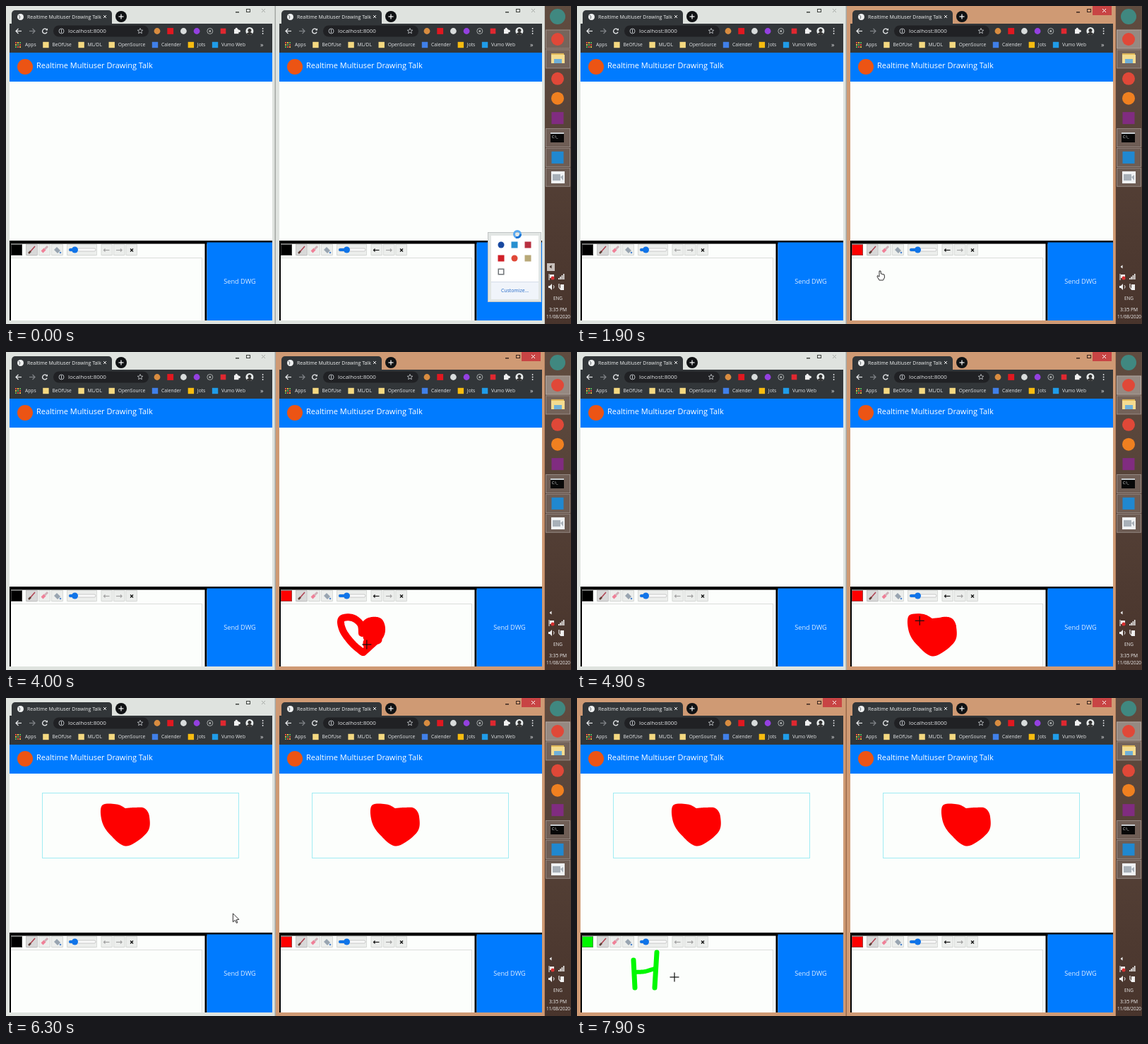
Write an HTML page with a canvas that moves like this. It is 800 px wide and 450 px high and loops after 8 s.

```html
<!DOCTYPE html>
<html lang="en">
<head>
<meta charset="utf-8">
<title>Drawing Talk</title>
<style>
html, body { margin: 0; width: 100%; height: 100%; overflow: hidden; }
canvas { display: block; width: 800px; height: 450px; }
</style>
</head>
<body>
<canvas id="stage" width="800" height="450"></canvas>
<script>
const g = document.getElementById('stage').getContext('2d');
const LOOP = 8000, SHIFT = 382, RED = '#fe0000', GREEN = '#00f800', TAN = '#cf9a74', PALE = '#dfe3df';
const at = { tray: 700, right: 900, pickRight: 1500, red: 1900, send: 5450, framed: 6000, left: 6400, pickLeft: 6600, green: 7000 };
const range = n => [...Array(n).keys()];

// Basic shapes
function rect(x, y, w, h, fill) { g.fillStyle = fill; g.fillRect(x, y, w, h); }
function square(x, y, r, fill) { rect(x - r, y - r, 2 * r, 2 * r, fill); }
function edge(x, y, w, h, color, lw = 1) {
  g.strokeStyle = color; g.lineWidth = lw; g.strokeRect(x + .5, y + .5, w - 1, h - 1);
}
function dot(x, y, r, fill) { g.fillStyle = fill; g.beginPath(); g.arc(x, y, r, 0, 7); g.fill(); }
function ring(x, y, r, color, lw = 1, a = 0, b = 7) {
  g.strokeStyle = color; g.lineWidth = lw; g.beginPath(); g.arc(x, y, r, a, b); g.stroke();
}
function round(x, y, w, h, r, fill) { g.fillStyle = fill; g.beginPath(); g.roundRect(x, y, w, h, r); g.fill(); }
function trace(p) { g.beginPath(); p.forEach(([x, y]) => g.lineTo(x, y)); }
function line(p, color, lw = 1) { trace(p); g.strokeStyle = color; g.lineWidth = lw; g.stroke(); }
function poly(p, fill) { trace(p); g.fillStyle = fill; g.fill(); }
function cross(x, y, r, color, lw = 1) {
  line([[x - r, y - r], [x + r, y + r]], color, lw); line([[x + r, y - r], [x - r, y + r]], color, lw);
}
function plus(x, y, r, color) {
  line([[x - r, y], [x + r, y]], color, 1.2); line([[x, y - r], [x, y + r]], color, 1.2);
}
function arrow(x, y, dir, head, color) {
  line([[x - 4 * dir, y], [x + 4 * dir, y]], color, 1.2);
  line([[x + (4 - head) * dir, y - head], [x + 4 * dir, y], [x + (4 - head) * dir, y + head]], color, 1.2);
}
function text(s, x, y, size, color, align = 'left') {
  g.font = size + 'px "Open Sans", "Noto Sans", sans-serif';
  g.textAlign = align; g.fillStyle = color; g.fillText(s, x, y);
}

// Ink: smooth curves through a few points
const pair = s => s.split(' ').map(q => q.split(',').map(Number));
function smooth(p) {
  const out = [];
  for (let i = 0; i < p.length - 1; i++) {
    const a = p[i - 1] || p[i], b = p[i], c = p[i + 1], d = p[i + 2] || c;
    for (let u = 0; u < 1; u += .1) out.push([0, 1].map(k => b[k] + .5 * u * (c[k] - a[k] +
      u * (2 * a[k] - 5 * b[k] + 4 * c[k] - d[k] + u * (3 * (b[k] - c[k]) + d[k] - a[k])))));
  }
  return [...out, p[p.length - 1]];
}
// Sweeps left and right n times while y runs from y0 to y1
function zigzag(n, y0, y1, leftAt, width) {
  return range(n).map(i => {
    const y = y0 + (y1 - y0) * i / (n - 1);
    return [leftAt(y) + (i % 2 ? 0 : width), y];
  });
}
const heart = smooth(pair('169,156 182,155 196,156 203,168 200,190 171,209.5 148,194 136,175 136,152 157,150.5 169,156'));
const sketch = heart.map(([x, y]) => [x + 334, y + 221]);
const stroke = (t0, t1, color, width, pts, inside) => ({ t0, t1, color, width, inside, pts: smooth(pts) });
const strokes = [
  stroke(2200, 2600, RED, 10, pair('504,398 502,385 490,376 475,378 477,394 490,412 505,425')),
  stroke(2650, 3250, RED, 10, pair('505,390 514,381 529,382 530,401 506,425')),
  stroke(3450, 4000, RED, 11, zigzag(8, 385, 411, () => 511, 16), true),
  stroke(4000, 4850, RED, 11, zigzag(12, 414, 380, y => 479 + (y - 380) / 2, 15), true),
  stroke(7150, 7350, GREEN, 7, pair('80,371 82,410')),
  stroke(7400, 7500, GREEN, 6, pair('82,388 96,387 110,383')),
  stroke(7550, 7760, GREEN, 7, pair('113,360 110,410'))
];

function drawn(s, t) {
  const n = (s.pts.length - 1) * Math.min(1, Math.max(0, (t - s.t0) / (s.t1 - s.t0)));
  const i = Math.floor(n), a = s.pts[i], b = s.pts[i + 1] || a, f = n - i;
  return [...s.pts.slice(0, i + 1), [a[0] + (b[0] - a[0]) * f, a[1] + (b[1] - a[1]) * f]];
}
function ink(t) {
  for (const s of strokes) {
    if (t < s.t0 || (s.color === RED && t >= at.send)) continue;
    g.save();
    if (s.inside) { trace(sketch); g.clip(); }
    g.lineCap = g.lineJoin = 'round';
    line(drawn(s, t), s.color, s.width);
    g.restore();
  }
  if (t >= 4850 && t < at.send) poly(sketch, RED);
}

// Browser window
function frame(active) {
  rect(0, 0, SHIFT, 450, active ? TAN : PALE);
  rect(380.5, 0, 1.5, 450, active ? '#9a6a4c' : '#a4a8a4');
  if (active) rect(348, 0, 27, 13, '#c84444');
  const dark = active ? '#3c2820' : '#404440';
  rect(325, 8, 5, 1.5, dark);
  edge(340, 4, 6, 5, dark);
  cross(364.5, 6.5, 2.5, active ? '#fff' : '#a8aca8');
}
function tabs() {
  round(8, 6, 142, 24, [5, 5, 0, 0], '#323639');
  rect(5, 25, 372, 41, '#323639');
  dot(20.5, 15.5, 4.5, '#eef0f0');
  line([[18, 13], [20, 15], [19, 18]], '#62686c');
  text('Realtime Multiuser Drawing Talk', 30, 18, 7, '#eef0f0');
  cross(140, 15, 2, '#e8e8e8');
  dot(163, 15, 8, '#101214');
  plus(163, 15, 3.5, '#fff');
}
function addressBar() {
  const y = 35.5;
  arrow(18, y, -1, 3.5, '#e8eaec');
  arrow(37, y, 1, 3.5, '#808488');
  ring(55, y, 3.3, '#e8eaec', 1.3, .4, 5.5);
  poly([[56, 34.5], [59, 34.5], [59, 31.5]], '#e8eaec');
  round(67, 27.5, 135, 16, 8, '#202124');
  ring(78.5, y, 3.5, '#b8bcc0'); rect(78, 33, 1, 5, '#b8bcc0');
  text('localhost:8000', 88, 38.3, 8, '#e0e2e4');
  line(range(11).map(i => {
    const a = i * Math.PI / 5, r = i % 2 ? 1.8 : 4;
    return [190 + r * Math.sin(a), y - r * Math.cos(a)];
  }), '#c8ccd0', .8);

  const slot = i => 214 + 18.7 * i;
  ['#d88c40', '', '#d8dcdc', '#9440e0'].forEach((c, i) => c && dot(slot(i), y, 4.4, c));
  square(slot(1), y, 4.4, '#e01820');
  ring(slot(4), y, 4, '#a8acac'); dot(slot(4), y, 1.5, '#a8acac');
  square(slot(5), y, 3.8, '#e02830');
  square(slot(6), y + .5, 3.2, '#f0f0f0'); dot(slot(6), y - 3, 1.7, '#f0f0f0'); dot(slot(6) + 4, y, 1.7, '#f0f0f0');
  g.save();
  g.beginPath(); g.arc(slot(7), y, 5.5, 0, 7); g.clip();
  square(slot(7), y, 6, '#e8ecec'); dot(slot(7), y - 1, 2.5, '#303030'); dot(slot(7), y + 6, 4.5, '#303030');
  g.restore();
  for (const k of [-1, 0, 1]) dot(slot(8), y + 3.5 * k, .9, '#e8eaec');
}
function bookmarks() {
  const dots = ['#e85040', '#e8b840', '#58b058'];
  for (const i of range(9)) rect(13 + i % 3 * 3, 51 + (i / 3 | 0) * 3, 2, 2, dots[(i + (i / 3 | 0)) % 3]);
  const marks = [['Apps'], ['BeOfUse', '#f4d880'], ['ML/DL', '#f4d880'], ['OpenSource', '#f4d880'],
    ['Calender', '#4080e8'], ['Jots', '#f8bc10'], ['Vumo Web', '#209ce8']];
  let x = 27;
  for (const [name, color] of marks) {
    if (color) square(x - 9, 55, 4.2, color);
    text(name, x, 57.3, 6.7, '#e4e6e8');
    x += g.measureText(name).width + 22.8;
  }
  text('»', 360, 57.5, 9, '#e8e8e8');
}
function tool(x, w, on) {
  round(x, 337, w, 16.5, 2, on ? '#d8d8d8' : '#eceeec');
  edge(x, 337, w, 16, on ? '#c0c0c0' : '#d4d6d4', .8);
}
function toolbar(t, right) {
  const picked = right ? t >= at.red : t >= at.green;
  rect(7, 337.5, 16, 15.5, picked ? (right ? RED : GREEN) : '#000');
  edge(7, 337, 16, 16, '#606060', .6);
  for (const i of range(3)) tool(28 + 18 * i, 17, !i);
  line([[34, 348], [41, 340]], '#b04050', 1.5); line([[32, 350], [35, 347]], '#604038', 2.5);
  line([[51, 348], [55, 344]], '#f08098', 4); line([[55, 344], [59, 340]], '#d0b0b8', 3);
  poly([[68, 345], [72, 341], [77, 346], [73, 350]], '#98a4b0'); dot(77, 349, 1.3, '#5088d0');
  tool(86, 43);
  const thumb = right ? 100.5 : 97.5;
  round(89, 343, 38, 4, 2, '#fafafa');
  g.strokeStyle = '#b8b8b8'; g.lineWidth = .7; g.stroke();
  round(89, 343, thumb - 89, 4, 2, '#1074e8'); dot(thumb, 345, 4.5, '#1074e8');
  for (const i of range(3)) tool(134.5 + 17.5 * i, 16.5);
  arrow(142.5, 345.5, -1, 2, right ? '#181818' : '#a0a0a0');
  arrow(160, 345.5, 1, 2, '#a0a0a0');
  cross(178, 345.5, 2, '#101010', 1.3);
  if (right && t >= 1050 && t < at.pickRight) edge(28, 337, 17.5, 17, '#101010', 1.7);
}
function picker() {
  rect(8, 357, 145, 36, '#f4f4f4'); edge(8, 357, 145, 36, '#c8c8d0');
  const s = 10.6;
  for (const row of range(3)) {
    rect(10, 359 + row * s, s, s, `hsl(0 0% ${100 - 50 * row}%)`);
    for (const col of range(12))
      rect(23 + col * s, 359 + row * s, s + .2, s + .2, `hsl(${290 + 30 * col} 78% ${64 - 15 * row}%)`);
  }
}
function page(t, right) {
  rect(5, 66, 372, 41, '#007bff');
  dot(27, 86, 11, '#ec5414');
  text('Realtime Multiuser Drawing Talk', 43, 87.5, 11, '#fff');
  rect(5, 107, 372, 338, '#fcfefc');
  if (t >= at.send) poly(heart, RED);
  if (t >= at.framed) edge(51, 134, 279, 93, '#a0ecf4');
  rect(5, 332, 372, 4.5, '#000');
  rect(5, 332, 2, 113, '#000');
  rect(281.5, 332, 3, 113, '#000');
  const hover = right && t > 5200 && t < 5850;
  rect(284.5, 334.5, 92.5, 110.5, hover ? '#0069d9' : '#007bff');
  text('Send DWG', 331, 393.3, 9.2, '#d8eaff', 'center');
  rect(7, 356, 271, 1, '#dcdedc'); rect(277, 356, 1, 89, '#dcdedc');
  toolbar(t, right);
  if (right ? t >= at.pickRight && t < at.red : t >= at.pickLeft && t < at.green) picker();
}

// Desktop edge
function sidebar(t) {
  const bg = g.createLinearGradient(0, 0, 0, 450);
  bg.addColorStop(0, '#604c40'); bg.addColorStop(1, '#48342c');
  rect(763, 0, 37, 450, bg);
  const slot = i => 47 + 27.9 * i;
  for (const i of [0, 1, 5, 6, 7]) {
    rect(764, slot(i) - 13.5, 35, 27, `rgba(255,255,255,${!i && t >= at.right ? .35 : .15})`);
    edge(764, slot(i) - 13.5, 35, 27, 'rgba(255,255,255,.25)');
  }
  dot(781, 15, 11, '#408880');
  for (const i of [0, 2, 3]) dot(781, slot(i), 9, i < 3 ? '#e04838' : '#f08020');
  square(781, slot(4), 8.5, '#802c80');
  square(781, slot(6), 8.5, '#2088d0');
  rect(772, 67, 18, 3, '#e0b858'); rect(772, 69, 19, 12, '#f4dc90'); rect(776, 75, 11, 6, '#70b0d8');
  rect(771, 179, 19, 14, '#080808'); rect(771, 179, 19, 2, '#c8ccd0');
  text('C:\\_', 773, 187, 5, '#fff');
  rect(772, 234, 19, 17, '#f0f2f4'); rect(774, 238, 11, 9, '#a8b0b8'); poly([[785, 242], [789, 239], [789, 247]], '#a8b0b8');

  const white = '#f0f0f0', open = t < at.tray;
  if (open) rect(766, 364, 11, 11, '#c8c0bc');
  poly([[772.5, 366.5], [772.5, 371.5], [769.5, 369]], open ? '#382820' : white);
  rect(768.5, 379, 1, 9, white); rect(770, 380, 6, 5, white); dot(774, 385, 2.5, '#d83030');
  for (const i of range(4)) rect(782 + i * 2.3, 385 - i * 2, 1.6, 2 + i * 2, white);
  poly([[768, 396], [770, 396], [773, 393], [773, 402], [770, 399], [768, 399]], white);
  ring(773, 397.5, 3, white, 1, -.9, .9);
  rect(785, 394, 5, 8, white); line([[783, 393], [783, 398], [785, 401]], white, 1.2);
  text('ENG', 781.5, 416, 6.4, white, 'center');
  text('3:35 PM', 781.5, 432, 6.7, white, 'center');
  text('11/08/2020', 782, 442, 6.4, white, 'center');
}
function tray() {
  rect(682, 320, 76, 99, '#e2e6e4'); edge(682, 320, 76, 99, '#b8bcbc', .8);
  rect(687, 325, 67, 90, '#fff'); rect(687, 390, 67, 25, '#f0f4fa'); rect(687, 390, 67, 1, '#d4dce8');
  text('Customize...', 720.5, 404.5, 6.9, '#2068c8', 'center');
  ['#1848a0', '#2890d0', '#b83040', '#d02028', '#e04838', '#b8a878', '#707478'].forEach((c, i) =>
    (i % 4 ? square : dot)(701 + i % 3 * 19, 338 + (i / 3 | 0) * 19, 4.5, c));
  square(701, 376, 3, '#fff');
}

// Pointer: rests where it acts, eases between
const stops = [[0, 724, 323], [350, 724, 323], [at.right, 540, 290], [1150, 419, 346], [1300, 419, 346],
  [at.pickRight, 397, 346], [at.red, 429, 375], [5350, 693, 390], [5700, 693, 390],
  [at.left, 300, 300], [at.pickLeft, 15, 345], [6880, 96, 374], [at.green, 96, 374], [7890, 138, 395], [LOOP, 138, 395]];
for (const s of strokes) stops.push([s.t0, ...s.pts[0]], [s.t1, ...s.pts[s.pts.length - 1]]);
stops.sort((a, b) => a[0] - b[0]);

function pointerAt(t) {
  const s = strokes.find(s => t >= s.t0 && t <= s.t1);
  if (s) return drawn(s, t).pop();
  const i = stops.findIndex(k => k[0] > t), a = stops[i - 1], b = stops[i];
  const u = (t - a[0]) / (b[0] - a[0]), e = u * u * (3 - 2 * u);
  return [a[1] + (b[1] - a[1]) * e, a[2] + (b[2] - a[2]) * e];
}
const handShape = pair('-1,0 1,0 1.5,4 6,5 6.5,9 4.5,13 -1,13 -4,8 -3.5,6.5 -1,8 -1,0');
const arrowShape = pair('0,0 0,12 3,9.5 5,13.5 6.5,13 4.8,9 8.5,8.5 0,0');
function pointer(t) {
  const within = (a, b) => t >= a && t < b;
  g.save(); g.translate(...pointerAt(t));
  if (t < 400) {
    ring(0, 0, 4.5, '#58a8f0', 3);
    ring(0, 0, 4.5, '#1870d0', 3, t / 150, t / 150 + 2);
  } else if (within(2050, 5050) || t >= 7060) {
    plus(0, 0, 6.5, '#101010');
  } else {
    const hand = within(1080, 2050) || within(5200, 5850) || within(6500, 7060);
    const shape = hand ? handShape : arrowShape;
    poly(shape, '#fff'); line(shape, '#181818', .9);
  }
  g.restore();
}

function draw(t) {
  for (const right of [false, true]) {
    g.save();
    if (right) g.translate(SHIFT, 0);
    frame(t >= (right ? at.right : at.left));
    tabs();
    addressBar();
    bookmarks();
    page(t, right);
    g.restore();
  }
  ink(t);
  sidebar(t);
  if (t < at.tray) tray();
  pointer(t);
}
const start = performance.now();
function tick() {
  draw((performance.now() - start) % LOOP);
  requestAnimationFrame(tick);
}
tick();
</script>
</body>
</html>
```
